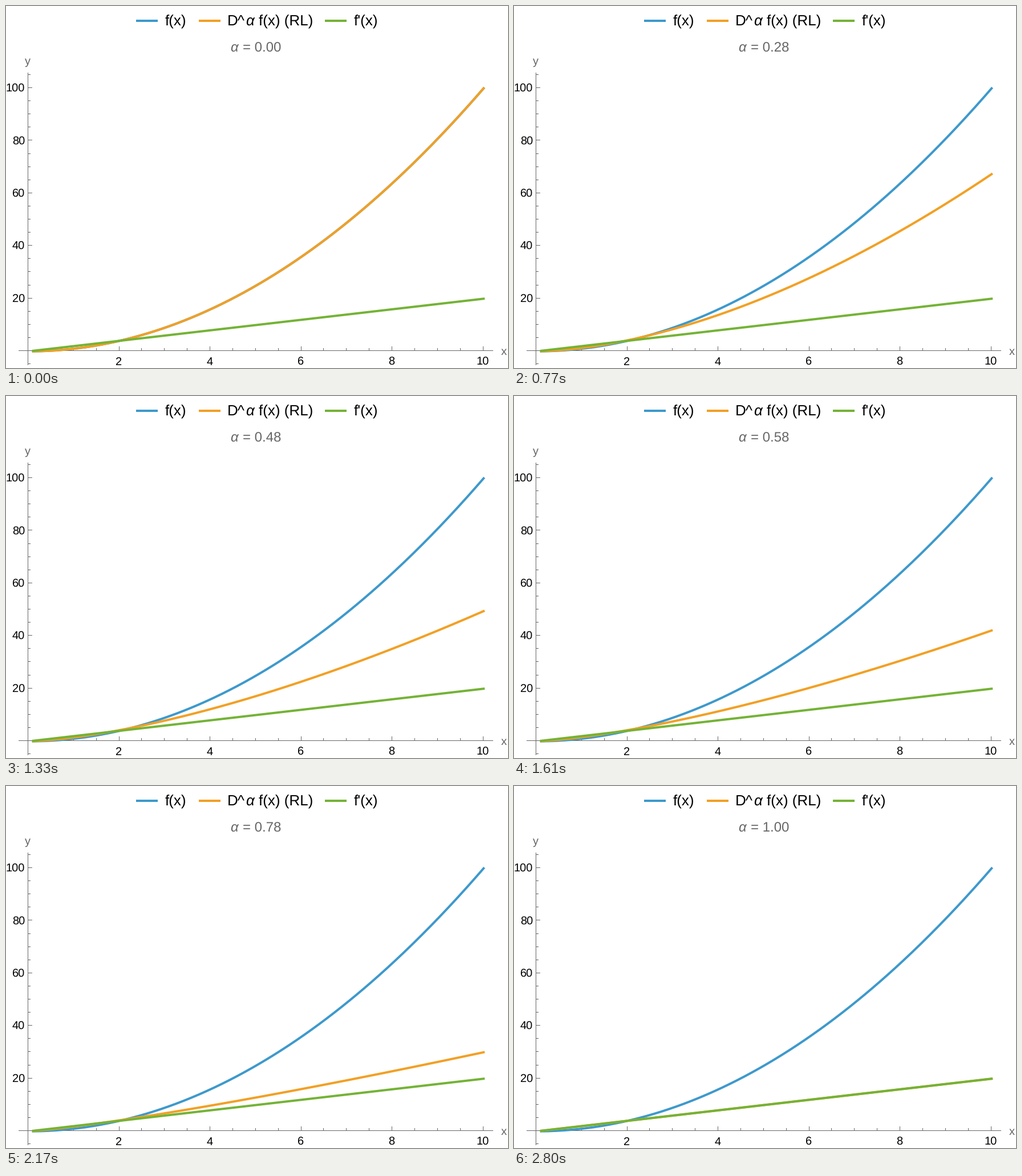
A matplotlib script for the animation above (2870 ms loop, 880 by 636 pixels).

```python
import math

import matplotlib.pyplot as plt
import numpy as np
from matplotlib.animation import FuncAnimation

W, H, DPI = 880, 636, 80
PT = 72 / DPI  # points per pixel
FRAMES, INTERVAL = 41, 70

BLUE, ORANGE, GREEN = "#3d99cc", "#f2a024", "#74b336"
GRAY = "#666666"

X0, Y0 = 38.5, 605.5  # pixel position of the axes' origin
SX, SY = 79.75, 4.62  # pixels per unit
CURVE_SHIFT = 1.2  # curves sit slightly right of and below the axes
DIGIT = 0.556  # digit advance in em

plt.rcParams["font.family"] = "Liberation Sans"
plt.rcParams["text.hinting"] = "none"

fig = plt.figure(figsize=(W / DPI, H / DPI), dpi=DPI, facecolor="white")
ax = fig.add_axes([0, 0, 1, 1])
ax.set_xlim(0, W)
ax.set_ylim(H, 0)
ax.axis("off")


def label(x, baseline, text, size, color="black", style="normal"):
    return ax.text(x, baseline, text, fontsize=size * PT, color=color,
                   style=style, ha="left", va="baseline")


def rule(x1, y1, x2, y2):
    ax.plot([x1, x2], [y1, y2], color=GRAY, lw=PT,
            solid_capstyle="butt", snap=False)


def curve(x, y, color, cap="projecting"):
    return ax.plot(x, y, color=color, lw=4 * PT, solid_capstyle=cap,
                   solid_joinstyle="round", snap=False)[0]


def crisp(v):
    """Centre of the pixel that holds v."""
    return math.floor(v) + 0.5


def to_px(y):
    return Y0 + CURVE_SHIFT - SY * y


def draw_axes():
    rule(22, Y0, 854, Y0)
    rule(X0, 117, X0, 631)
    for i in range(1, 21):
        px = X0 + SX * i / 2
        major = i % 4 == 0
        rule(crisp(px), Y0, crisp(px), Y0 - (7.5 if major else 4.5))
        if major:
            text = str(i // 2)
            label(px - 0.5 - DIGIT * 10 * len(text), 631, text, 20)
    for v in range(-5, 106, 5):
        if v == 0:
            continue
        py = Y0 - SY * v
        major = v % 20 == 0
        rule(X0, crisp(py), X0 + (7.5 if major else 4.5), crisp(py))
        if major:
            text = str(v)
            label(33 - DIGIT * 20 * len(text), py + 7.5, text, 20)
    label(33, 103, "y", 20, GRAY)
    label(868, 613, "x", 20, GRAY)


def draw_legend():
    for x, color in ((228, BLUE), (338, ORANGE), (559, GREEN)):
        curve([x, x + 38], [26, 26], color, "butt")
    label(279, 34.5, "f(x)", 26)
    label(388, 34.5, "D^", 26)
    label(420, 34.5, "α", 26, style="italic")
    label(443, 34.5, "f(x) (RL)", 26)
    label(610, 34.5, "f'(x)", 26)


def frac_derivative(x, alpha):
    """Riemann-Liouville derivative of x**2."""
    return 2 / math.gamma(3 - alpha) * x ** (2 - alpha)


xs = np.linspace(0.1, 10, 300)
xs_px = X0 + CURVE_SHIFT + SX * xs

draw_axes()
draw_legend()
label(393, 81, "α", 24, GRAY, "italic")
value = label(414.6, 81, "", 24, GRAY)

curve(xs_px, to_px(xs ** 2), BLUE)
fractional = curve(xs_px, to_px(xs ** 2), ORANGE)
curve(xs_px, to_px(2 * xs), GREEN)


def update(i):
    alpha = i / (FRAMES - 1)
    hundredths = (i * 5 + 1) // 2  # rounds halves up
    value.set_text(f"= {hundredths / 100:.2f}")
    fractional.set_ydata(to_px(frac_derivative(xs, alpha)))
    return fractional, value


anim = FuncAnimation(fig, update, frames=FRAMES, interval=INTERVAL,
                     repeat=True, repeat_delay=0)
plt.show()
```
